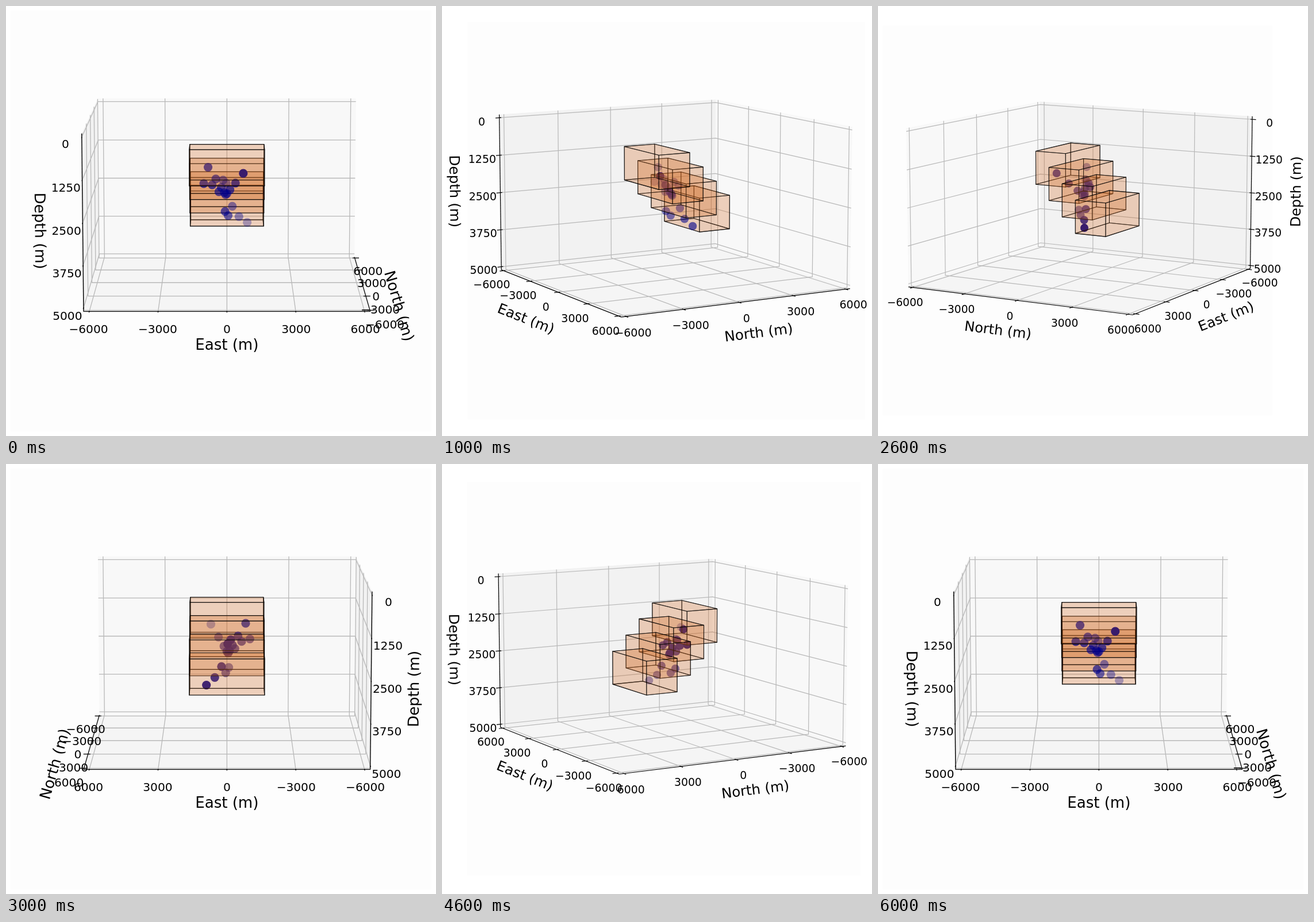
An HTML page with a canvas for the animation above (7 s loop, 748 by 748 pixels).

```html
<!DOCTYPE html>
<html lang="en">
<head>
<meta charset="utf-8">
<title>Rotating 3D fault model</title>
<style>
  html, body { margin: 0; width: 100%; height: 100%; overflow: hidden; background: #fff; }
  canvas { display: block; width: 748px; height: 748px; }
</style>
</head>
<body>
<canvas id="stage"></canvas>
<script>
const canvas = document.getElementById('stage');
const ctx = canvas.getContext('2d');
const ratio = window.devicePixelRatio || 1;
canvas.width = canvas.height = 748 * ratio;

// Camera: half a pane is one unit wide
const SIN = 0.165, COS = Math.sqrt(1 - SIN * SIN);
const DIST = 16.77, SCALE = 236.25, HEIGHT = 0.626;
const FIGURE = 732;

// Each view is the figure fitted to the stage; views are 60 degrees apart
const front = { zoom: 1, cx: 384.3, cy: 336.3 };
const right = { zoom: 0.945, cx: 400, cy: 337.9 };
const left = { zoom: 0.9265, cx: 356.6, cy: 338 };
const back = { zoom: 0.936, cx: 395.6, cy: 338.2 };
const views = [front, right, left, front, back, left, front];

const steps = [-2, -1, 0, 1, 2];
const distLabels = steps.map(k => String(k * 3000).replace('-', '−'));
const depthLabels = steps.map(k => String(2500 - k * 1250));

// Events from west to east: they zigzag up and down the dipping
// fault, widest at the ends, with a slower wave in the middle
const events = Array.from({ length: 19 }, (_, i) => {
  const u = (i - 9) / 9;
  const zig = Math.cos(Math.PI * i);
  const wave = Math.cos(Math.PI * i / 2) * (1 - u * u) ** 4;
  const east = -60 + 1000 * u - 250 * Math.sin(Math.PI * u);
  const north = 50 - 430 * u * u - 350 * wave + 1000 * zig * Math.max(u, 0) ** 2;
  const depth = 2400 + 360 * u - 430 * u * u + 500 * wave + zig * (40 + 300 * u + 620 * u * u);
  return toUnits(east, north, depth);
});

// Corner bits: 1 east, 2 north, 4 deep
const blocks = [0, 1, 2, 3].map(i => Array.from({ length: 8 }, (_, k) => toUnits(
  k & 1 ? 1700 : -1700,
  750 * i - (k & 2 ? 0 : 1700),
  500 * i + (k & 4 ? 1900 : 800)
)));
const faces = [[1, 2, 4], [2, 4, 1], [4, 1, 2]].flatMap(([bit, a, b]) =>
  [0, bit].map(k => [k, k | a, k | a | b, k | b]));

let zoom, cx, cy, ca, sa;

function toUnits(east, north, depth) {
  return [east / 6250, north / 6250, (2500 - depth) / 2604];
}

// Closeness to the eye
function near([e, n, z]) {
  return COS * (e * ca + n * sa) + SIN * z * HEIGHT;
}

function project(p) {
  const [e, n, z] = p;
  const s = zoom * SCALE / (1 - near(p) / DIST);
  const up = COS * z * HEIGHT - SIN * (e * ca + n * sa);
  return [cx + s * (n * ca - e * sa), cy - s * up];
}

function trace(points, closed) {
  ctx.beginPath();
  points.forEach(p => ctx.lineTo(...project(p)));
  if (closed) ctx.closePath();
}

function line(points, color) {
  trace(points);
  ctx.strokeStyle = color;
  ctx.stroke();
}

function fill(points, color) {
  trace(points, true);
  ctx.fillStyle = color;
  ctx.fill();
}

function text(str, x, y, size, drop, angle = 0) {
  ctx.save();
  ctx.translate(x, y);
  ctx.rotate(angle);
  ctx.font = `${size * zoom}px "DejaVu Sans", sans-serif`;
  ctx.fillStyle = '#000';
  ctx.fillText(str, 0, drop * size * zoom);
  ctx.restore();
}

// at(t, out) gives a point along the axis, pushed outwards by out;
// tickAt(t, out) moves it along the tick mark only
function drawAxis(name, labels, at, tickAt) {
  const ends = [at(-1, 0), at(1, 0)];
  line(ends, '#000');
  steps.forEach((k, i) => {
    const t = k * 0.48;
    line([tickAt(t, -0.0167), tickAt(t, 0.0333)], '#000');
    const [x, y] = project(at(t, 0.105));
    text(labels[i], x, y + 8 * zoom, 20.1, 0.365);
  });
  const [a, b] = ends.map(project);
  const [x, y] = project(at(0, 0.275));
  text(name, x, y + 1.2, 26, 0.315, Math.atan((b[1] - a[1]) / (b[0] - a[0])));
}

function drawAxes() {
  const we = ca < -0.01 ? 1 : -1;
  const wn = sa < 0 ? 1 : -1;

  fill([[we, -1, -1], [we, 1, -1], [we, 1, 1], [we, -1, 1]], '#f2f2f2');
  fill([[-1, wn, -1], [1, wn, -1], [1, wn, 1], [-1, wn, 1]], '#f8f8f8');
  fill([[-1, -1, -1], [1, -1, -1], [1, 1, -1], [-1, 1, -1]], '#f5f5f5');

  steps.map(k => k * 0.48).forEach(t => {
    line([[t, -wn, -1], [t, wn, -1], [t, wn, 1]], '#b8b8b8');
    line([[-we, t, -1], [we, t, -1], [we, t, 1]], '#b8b8b8');
    line([[we, -wn, t * 2 / 2], [we, wn, t], [-we, wn, t]], '#b8b8b8');
  });

  drawAxis('East (m)', distLabels,
    (t, o) => [t, -wn * (1 + o), -1 - o],
    (t, o) => [t, -wn * (1 + o), -1]);
  drawAxis('North (m)', distLabels,
    (t, o) => [-we * (1 + o), t, -1 - o],
    (t, o) => [-we * (1 + o), t, -1]);
  drawAxis('Depth (m)', depthLabels,
    (t, o) => [we * (1 + o), -wn * (1 + o), t],
    (t, o) => [we, -wn * (1 + o), t]);
}

function drawBlock(corners) {
  const sum = face => face.reduce((total, k) => total + near(corners[k]), 0);
  ctx.lineWidth = 1.15 * zoom;
  [...faces].sort((a, b) => sum(a) - sum(b)).forEach(face => {
    fill(face.map(k => corners[k]), 'rgba(210,105,30,0.15)');
    ctx.strokeStyle = 'rgba(0,0,0,0.7)';
    ctx.stroke();
  });
}

function drawEvents(points) {
  const sorted = [...points].sort((a, b) => near(a) - near(b));
  const lo = near(sorted[0]), hi = near(sorted[sorted.length - 1]);
  sorted.forEach(p => {
    const alpha = 0.3 + 0.7 * (near(p) - lo) / (hi - lo);
    ctx.beginPath();
    ctx.arc(...project(p), 7.6 * zoom, 0, 2 * Math.PI);
    ctx.fillStyle = `rgba(0,0,139,${alpha})`;
    ctx.fill();
  });
}

function draw(index) {
  ({ zoom, cx, cy } = views[index]);
  const azimuth = (index * 60 - 90) * Math.PI / 180;
  ca = Math.cos(azimuth);
  sa = Math.sin(azimuth);

  ctx.setTransform(ratio, 0, 0, ratio, 0, 0);
  ctx.fillStyle = '#fff';
  ctx.fillRect(0, 0, 748, 748);
  const size = FIGURE * zoom;
  ctx.fillStyle = '#fdfdfd';
  ctx.fillRect(cx - 0.514 * size, cy - 0.4485 * size, size, size);

  ctx.textAlign = 'center';
  ctx.lineJoin = 'round';
  ctx.lineWidth = 1.3 * zoom;
  drawAxes();

  // Whole groups are painted in order of their nearest point
  const groups = blocks.map(points => ({ points, paint: drawBlock }));
  groups.push({ points: events, paint: drawEvents });
  groups.forEach(g => { g.near = Math.max(...g.points.map(near)); });
  groups.sort((a, b) => a.near - b.near).forEach(g => g.paint(g.points));
}

let shown = -1;
function tick() {
  const index = Math.floor(performance.now() / 1000) % views.length;
  if (index !== shown) draw(shown = index);
  requestAnimationFrame(tick);
}
tick();
</script>
</body>
</html>
```
